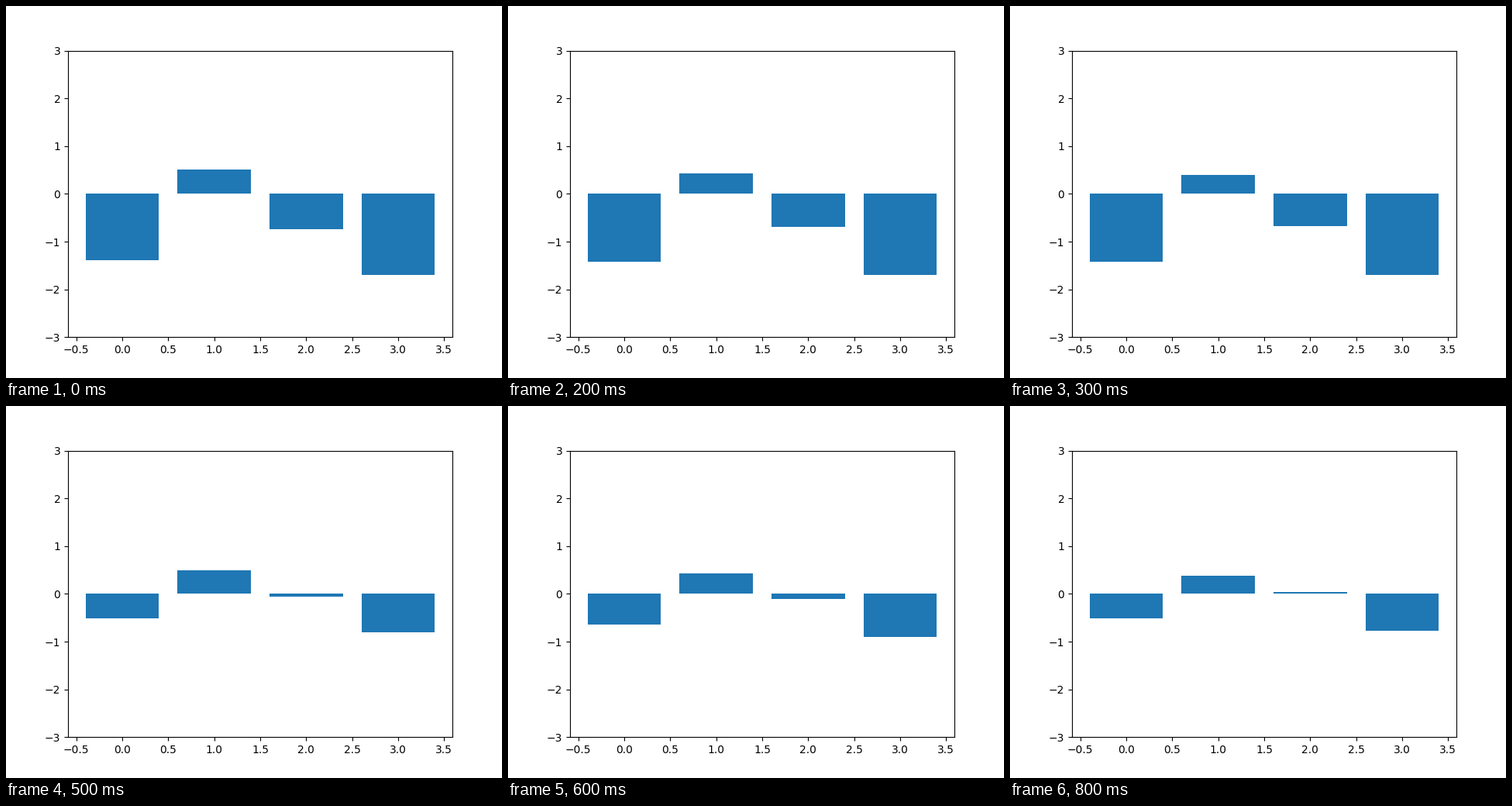
Write a matplotlib script that moves like this. It is 640x480 px and loops after 900 ms.

```python
import numpy as np
import matplotlib.pyplot as plt
from matplotlib.animation import FuncAnimation

FRAMES = 9
STEP_MS = 100
JUMP_STEP = 4

# One value per bar: first height, drift per step, size of the jump.
start = np.array([-1.385, 0.515, -0.745, -1.70])
drift = np.array([-0.015, -0.04, 0.025, 0.0])
jump = np.array([1.16, 0.22, 0.68, 1.10])


def lift(step):
    """Share of the jump in effect: nothing, then full with a shared sag."""
    if step < JUMP_STEP:
        return 0.0
    u = (step - JUMP_STEP) / (FRAMES - 1 - JUMP_STEP)
    return 1 - 0.15 * u - 0.205 * np.sin(np.pi * u)


def heights(step):
    return start + drift * step + jump * lift(step)


fig, ax = plt.subplots(figsize=(6.4, 4.8), dpi=100)
bars = ax.bar(range(len(start)), heights(0))
ax.set_ylim(-3, 3)


def update(step):
    for bar, height in zip(bars, heights(step)):
        bar.set_height(height)
    return list(bars)


anim = FuncAnimation(fig, update, frames=FRAMES, interval=STEP_MS,
                     repeat=True, repeat_delay=0)
plt.show()
```
